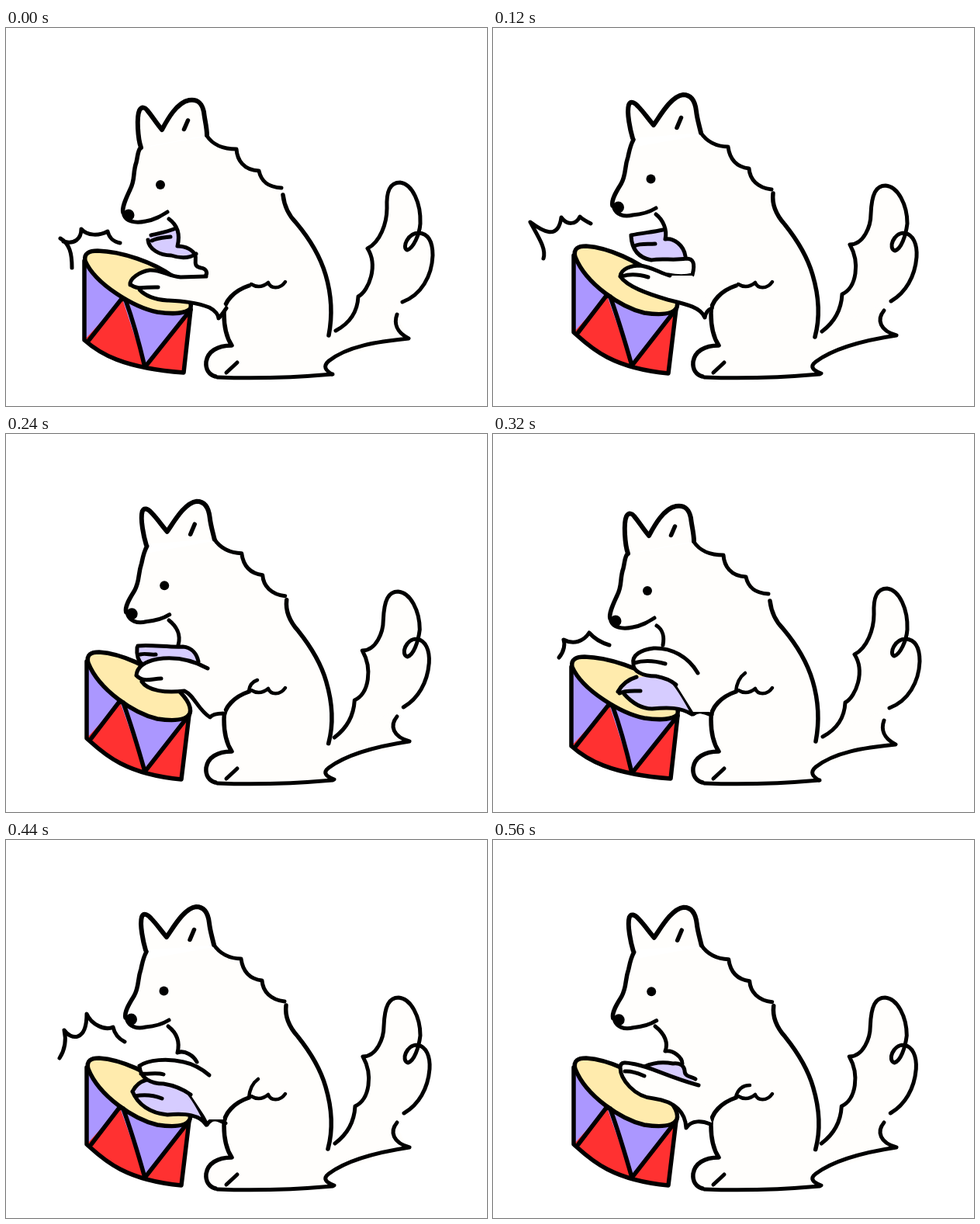
An HTML page with a canvas for the animation above (640 ms loop, 620x487 px).

```html
<!DOCTYPE html>
<html lang="en">
<head>
<meta charset="utf-8">
<title>Drumming dog</title>
<style>
html, body { margin: 0; width: 100%; height: 100%; overflow: hidden; background: #fff; }
canvas { display: block; }
</style>
</head>
<body>
<canvas id="stage" width="620" height="487"></canvas>
<script>
const ctx = document.getElementById('stage').getContext('2d');
const FUR = '#fffefc', LILAC = '#d6ccff', PURPLE = '#ab97ff', RED = '#ff3131', CREAM = '#ffebad';
const LOOP = 640;

function fill(d, color) {
  ctx.fillStyle = color;
  ctx.fill(new Path2D(d));
}
function ink(d, width = 5) {
  ctx.lineWidth = width;
  ctx.stroke(new Path2D(d));
}
function dot([x, y], r) {
  ctx.fillStyle = '#000';
  ctx.beginPath();
  ctx.arc(x, y, r, 0, Math.PI * 2);
  ctx.fill();
}

const low = {
  face: 'M151 238 C149 231 155 219 160 208 C167 195 163 187 168 173 C170 164 170 158 173 155',
  ears: 'M174 154 C170 143 168 115 172 106 C175 101 179 102 182 106 C188 113 194 123 201 131 '
    + 'C208 118 220 96 236 93 C249 91 253 99 255 108 C256 118 259 128 259 138',
  mouth: 'M152 241 C155 249 166 252 180 249 C192 247 200 242 208 237',
  mark: 'M229.5 130.5 L234.5 119',
  eye: [199, 202],
  nose: [158, 241],
  back: 'M259 139 C266 150 280 156 297 156 C298 170 306 183 326 184 C329 198 338 205 355 206',
  spine: 'M357 215 C359 232 366 243 374 251 C390 270 404 291 412 318 C420 345 421 370 416 396',
  tail: 'M425 390 C440 382 453 368 454 346 C468 338 480 306 466 284 C482 276 491 252 491 232 '
    + 'C490 210 495 199 508 199 C524 201 535 226 534 252 C533 266 525 284 517 286 '
    + 'C510 283 518 264 532 264 C545 265 550 277 550 293 C549 320 535 344 511 353',
  rump: 'M504 369 C500 380 503 392 519 400 C478 404 440 410 416 429 C408 436 412 441 420 446',
  rim: 'M102 300 C100 290 108 287 118 287 C150 288 190 302 215 320 C230 332 240 350 238 361 '
    + 'C232 368 215 369 195 366 C165 360 115 330 102 300Z',
  drum: { x: 101, top: 300, base: 402, peak: [150, 349], dip: [179, 437], edge: [238, 363], foot: [229, 444] }
};
const high = {
  face: 'M154 229 C152 221 160 209 165 201 C172 188 169 181 174 166 C176 157 177 151 181 144',
  ears: 'M180 142 C177 132 172 109 175 99 C177 94 182 95 187 101 C194 108 200 117 207 125 '
    + 'C215 114 229 88 245 86 C258 86 261 98 262 107 C263 117 266 126 268 135',
  mouth: 'M156 232 C159 240 168 244 180 241 C193 240 202 237 210 232',
  mark: 'M237 128.5 L242.5 115.5',
  eye: [203.5, 194.5],
  nose: [161.5, 231],
  back: 'M268 135 C275 146 288 153 303 153 C305 168 313 179 330 181 C331 195 341 206 359 208',
  spine: 'M361 213 C359 230 367 243 376 253 C388 268 404 290 412 318 C420 345 422 372 415 398',
  tail: 'M424 391 C440 379 449 362 450 343 C469 334 473 302 460 279 C478 279 487 255 487 240 '
    + 'C488 213 494 203 506 203 C522 204 534 228 534 252 C532 268 526 285 518 287 '
    + 'C509 284 516 264 530 264 C542 266 547 279 546 295 C544 320 532 341 513 352',
  rump: 'M504 364 C494 376 499 390 520 396 C480 402 440 412 416 430 C408 436 412 441 423 445',
  rim: 'M106 295 C103 284 110 281 120 281 C150 283 185 300 212 321 C230 336 240 350 237 360 '
    + 'C232 369 215 370 195 367 C165 360 120 330 106 295Z',
  drum: { x: 104, top: 293, base: 392, peak: [147, 345], dip: [179, 435], edge: [236, 362], foot: [226, 445] }
};
const settled = { ...high, nudge: 0.7 };

const shoulder = 'M316 330 C324 335 332 333 338 328 C341 336 353 337 360 327';
const raised = ' M313 332 C314 321 318 313 325 308';

// Each pair of arms: chest line, far hand (lilac) and near hand (fur), fill then lines.
const reach = {
  chest: 'M210 246 C221 254 225 265 221 281 C232 281 241 286 244 293 C246 300 240 306 251 309 C259 310 260 316 257 320',
  far: 'M185 267 L219 258 C224 264 220 273 221 281 C232 281 240 286 245 291 C238 298 225 297 213 293 C198 293 184 284 183 274Z',
  farInk: 'M187 267 C200 264 210 262 219 258 M188 274 C196 270 204 270 212 269 '
    + 'M183 273 C184 285 198 293 213 293 C225 297 236 297 245 291',
  near: 'M160 331 C159 323 172 314 185 312 C200 311 210 320 225 321 L258 320 L284 361 L274 374 '
    + 'C274 370 270 364 262 360 C245 353 225 352 208 351 C195 350 183 347 176 338Z',
  nearInk: 'M160 331 C159 323 172 314 185 312 C200 311 210 320 225 321 L258 320 '
    + 'M161 331 C170 338 182 333 196 334 M172 337 C181 347 195 350 208 351 '
    + 'C225 352 245 353 262 360 C270 364 274 370 274 374 C278 370 281 365 284 361',
  shoulder
};
const lower = {
  chest: 'M210 240 C219 247 225 260 222 272 C233 270 246 280 248 294',
  far: 'M178 267 L220 261 L222 274 C235 272 247 282 248 297 L205 300 C190 298 180 285 178 267Z',
  farInk: 'M178 267 C192 264 206 263 219 260 M182 281 C190 277 200 279 209 278 '
    + 'M178 268 C179 286 188 296 204 299 C218 296 232 300 249 297 C258 297 261 303 257 318 C246 321 236 320 226 318',
  near: 'M164 320 C165 310 178 306 190 306 C205 308 218 317 230 319 L257 319 L282 362 L273 373 '
    + 'C268 360 250 356 230 350 C205 344 175 335 164 320Z',
  nearInk: 'M164 320 C165 310 178 306 190 306 C205 308 216 316 228 319 M166 320 C178 316 190 318 200 321 '
    + 'M164 320 C173 333 198 342 225 350 C250 356 268 360 273 373 C274 367 277 363 282 361',
  shoulder
};
const lift = {
  chest: 'M210 240 C219 247 226 258 222 272',
  far: 'M169 274 C185 271 210 274 228 274 C240 275 246 284 248 294 L176 298 C171 293 168 285 169 274Z',
  farInk: 'M170 273 C185 271 210 275 228 274 C240 275 246 284 248 293 M169 275 C168 285 171 293 176 297 '
    + 'M173 284 C180 282 186 285 193 284',
  near: 'M168 311 C169 299 180 293 195 290 C215 287 238 290 260 302 L282 359 L264 366 '
    + 'C258 358 245 340 230 331 L205 332 C188 331 180 325 168 311Z',
  nearInk: 'M168 311 C169 299 180 293 195 290 C215 287 238 290 260 302 M168 311 C177 321 188 315 200 315 '
    + 'M175 319 C183 331 206 334 230 331 C243 337 247 355 263 365 C266 361 272 360 280 360',
  shoulder: shoulder + ' M313 331 C314 323 318 319 324 317'
};
const strike = {
  chest: 'M211 247 C219 252 221 262 219 272',
  far: 'M160 332 C168 320 180 313 200 312 C220 314 235 322 240 331 L258 360 C240 352 225 352 205 354 C188 352 178 343 172 336Z',
  farInk: 'M161 332 C167 321 175 316 185 313 M163 334 C170 330 180 331 190 331 '
    + 'M169 335 C178 345 190 354 205 354 C225 352 242 352 256 361 '
    + 'M234 322 C242 332 250 346 258 361 C266 354 274 360 282 362',
  near: 'M180 295 C180 284 192 278 207 276 C230 275 252 287 264 308 L280 358 L258 358 L236 323 '
    + 'C230 318 220 314 210 312 C192 312 180 305 180 295Z',
  nearInk: 'M181 297 C178 284 192 278 207 276 C230 275 252 287 264 308 M182 295 C195 291 208 292 222 296 '
    + 'M181 296 C180 305 192 312 210 312 C221 314 230 318 236 323',
  shoulder: shoulder + raised
};
const press = {
  chest: 'M209 240 C222 250 224 262 221 274 C230 270 242 278 246 286',
  far: 'M163 324 C168 315 175 310 181 309 L205 315 L237 327 L258 364 C250 354 232 352 208 354 C186 352 171 342 163 324Z',
  farInk: 'M163 324 C167 316 174 311 181 309 M166 330 C177 328 188 328 201 333 '
    + 'M163 324 C170 341 186 352 208 354 C232 352 250 354 258 367 '
    + 'M236 327 C245 338 252 352 259 367 C266 355 275 361 283 365',
  near: 'M172 291 C183 283 208 281 229 286 C243 289 255 297 262 303 L280 360 L259 360 L237 327 '
    + 'C226 319 214 315 203 314 C188 314 175 308 172 291Z',
  nearInk: 'M172 291 C183 283 208 281 229 286 C243 289 255 297 262 303 M172 291 C173 308 188 314 203 314 '
    + 'C216 316 228 321 238 328 M174 301 C184 302 194 299 203 302',
  shoulder: shoulder + raised
};
const rest = {
  chest: 'M209 240 C222 250 226 262 222 272 C232 270 244 280 244 288',
  far: 'M195 292 C208 286 222 286 232 288 C240 287 246 290 247 297 C248 306 256 306 264 316 L215 298Z',
  farInk: 'M195 292 C208 286 222 286 232 288 C240 287 246 290 247 297 C247 306 256 304 261 308',
  near: 'M164 293 C164 284 174 287 184 289 C205 293 225 305 265 316 L282 364 L249 371 '
    + 'C249 352 235 338 207 333 C182 331 164 308 164 293Z',
  nearInk: 'M164 293 C164 284 174 287 184 289 C205 293 225 305 265 316 M170 298 C180 297 188 301 195 304 '
    + 'M164 293 C164 308 182 331 207 333 C236 337 248 352 249 371 C256 360 270 362 280 366',
  shoulder: shoulder + ' M313 331 C316 320 322 316 331 316'
};

const sparks = {
  burst: 'M70 271 C82 278 85 290 85 309 M74 275 C88 279 97 272 97 259 C105 268 120 268 131 262 C133 270 137 275 147 277',
  spread: 'M52 256 C66 265 75 285 77 303 M54 258 C68 271 78 271 90 269 C98 265 93 254 92 243 '
    + 'C100 257 113 259 118 250 C124 256 130 262 136 268',
  fade: 'M65 297 C69 285 59 270 48 250 C64 262 84 274 88 244 C95 254 107 254 112 243 C116 247 122 250 126 252',
  tap: 'M85 288 C92 280 93 270 91 265 C104 272 117 267 124 256 C130 263 140 269 150 272',
  tapSpread: 'M75 284 C82 273 83 262 81 252 C95 263 110 260 111 236 C118 248 131 252 137 249 C141 257 146 262 152 264',
  tapFade: 'M69 281 C76 270 78 258 75 245 C84 258 104 260 104 224 C110 238 128 246 138 241 C140 250 145 256 153 260'
};

const timeline = [
  [0, low, reach, sparks.burst],
  [40, low, reach, sparks.spread],
  [120, high, lower, sparks.fade],
  [200, high, lower, ''],
  [240, settled, lift, ''],
  [320, low, strike, sparks.tap],
  [360, low, strike, sparks.tapSpread],
  [440, high, press, sparks.tapFade],
  [520, high, press, ''],
  [560, settled, rest, '']
];

function drawDrum({ rim, drum: { x, top, base, peak, dip, edge, foot } }) {
  const shell = `M${x} ${top} L${x} ${base} C${x + 19} ${base + 17} 150 438 ${foot} L${edge}`;
  const side = `${shell} L${peak}Z`;
  const [px, py] = peak;
  ctx.save();
  ctx.clip(new Path2D(side));
  fill(side, PURPLE);
  fill(`M${x} ${base} L${peak} L${dip} V480 H${x}Z M${dip} L${edge} V480 H${dip[0]}Z`, RED);
  ctx.restore();
  fill(rim, CREAM);
  ink(rim, 5.5);
  ink(shell, 5.5);
  ink(`M${x + 6} ${base} L${px - 1} ${py} L${px + 4} ${py + 1} Q${px + 17} ${py + 37} ${dip} L${edge}`, 5.5);
}

function drawHead({ face, ears, mouth, mark, eye, nose }) {
  ink(face, 5.5);
  ink(ears, 6);
  ink(mouth, 5);
  ink(mark, 5.5);
  dot(eye, 6);
  dot(nose, 7.5);
}

function drawBody(pose) {
  const { nudge = 0 } = pose;
  const [nx, ny] = pose.nose;
  fill(`M207 238 L223 262 L250 310 L281 368 L291 409 C262 412 256 440 272 449 L420 446 L416 430 L519 399
    L504 369 L511 353 L454 346 L425 390 L416 396 L412 318 L374 251 L356 206 L326 184 L297 156 L262 139
    L201 150 L174 155 L${nx - 6} ${ny - 4} L${nx + 22} ${ny + 8}Z`, FUR);
  fill(pose.ears, FUR);
  fill(pose.tail, FUR);
  ctx.save();
  ctx.translate(nudge, nudge);
  drawHead(pose);
  ink(pose.back, 5);
  ink(pose.spine, 5.5);
  ctx.restore();
  ctx.save();
  ctx.translate(-nudge, 0);
  ink(pose.tail, 5);
  ctx.restore();
  ink(pose.rump, 5);
  ink('M313 332 C295 338 280 352 281 368 C281 385 285 400 291 409 C272 409 260 417 258 430 C257 440 262 447 270 449', 5.5);
  ink('M273 450 C320 452 375 450 421 446', 5);
  ink('M284 444 L298 431', 5);
}

function drawArms(arms) {
  fill(arms.far, LILAC);
  ink(arms.chest, 5);
  ink(arms.farInk, 5);
  fill(arms.near, FUR);
  ink(arms.nearInk, 5);
  ink(arms.shoulder, 4.5);
}

function render(now) {
  const t = now % LOOP;
  const [, pose, arms, spark] = timeline.findLast(([start]) => start <= t);
  ctx.fillStyle = '#fff';
  ctx.fillRect(0, 0, 620, 487);
  ctx.strokeStyle = '#000';
  ctx.lineCap = ctx.lineJoin = 'round';
  drawBody(pose);
  drawDrum(pose);
  drawArms(arms);
  if (spark) ink(spark, 5);
}

const began = performance.now();
function tick() {
  render(performance.now() - began);
  requestAnimationFrame(tick);
}
tick();
</script>
</body>
</html>
```
